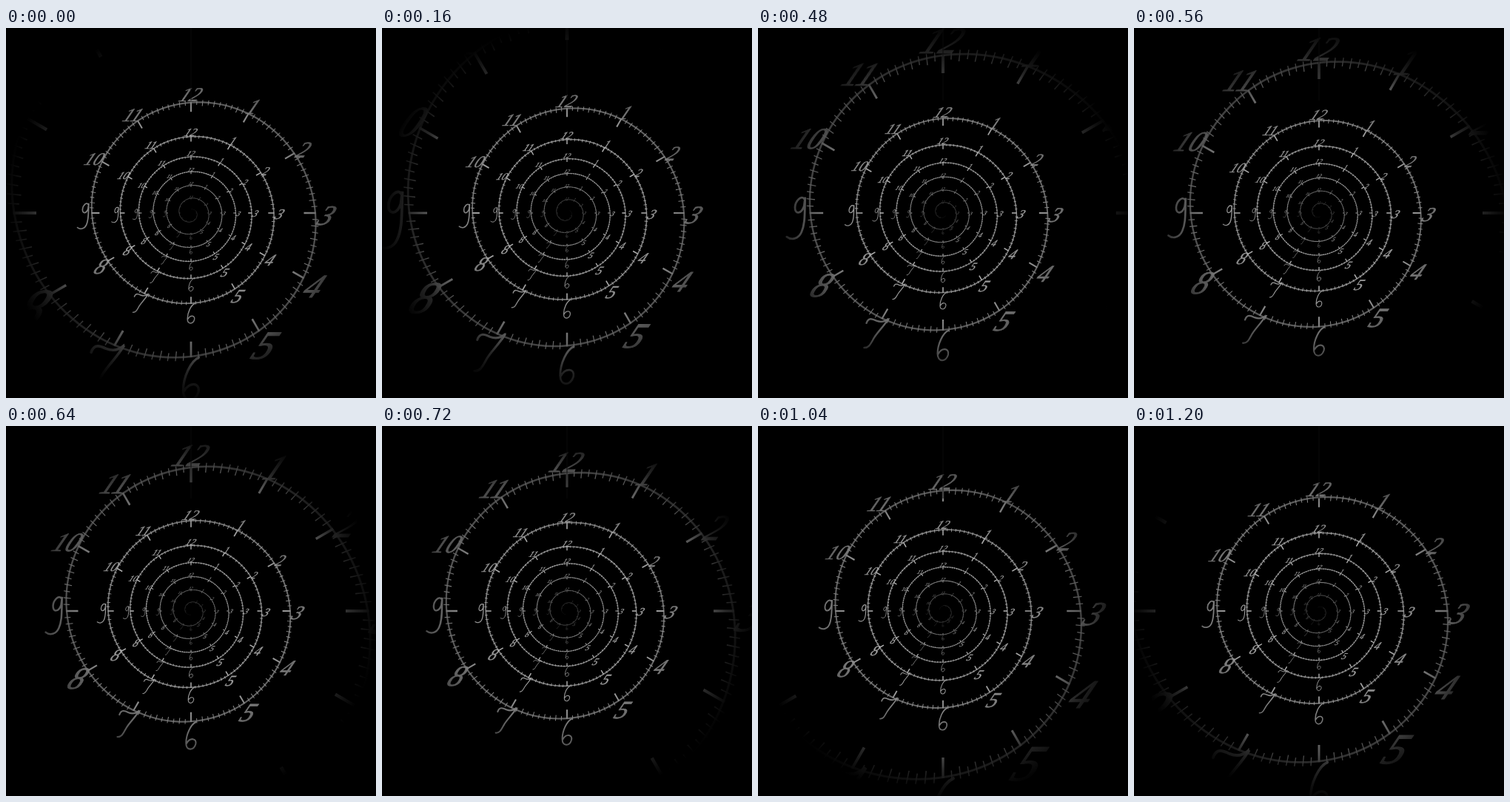
These frames come from a looping animation (500x500 px, 1.28 s). An HTML page:

```html
<!DOCTYPE html>
<html lang="en">
<head>
<meta charset="utf-8">
<title>Spiral clock</title>
<style>
  html, body { margin: 0; width: 100%; height: 100%; overflow: hidden; background: #000; }
  svg { display: block; width: 100vw; height: 100vh; }
  text { font: italic 145px "Liberation Serif", "Times New Roman", serif; text-anchor: middle; }
</style>
</head>
<body>
<svg viewBox="0 0 500 500">
  <defs>
    <radialGradient id="shade" gradientUnits="userSpaceOnUse" cx="250" cy="250" r="260"></radialGradient>
  </defs>
  <rect width="500" height="500" fill="#000"/>
  <g fill="#bcbcbc">
    <path id="ring" opacity=".72"/>
    <path id="ticks"/>
    <g id="labels" opacity=".92"></g>
  </g>
  <rect width="500" height="500" fill="url(#shade)"/>
  <path d="M250 0V98" stroke="#0b0b0b"/>
</svg>
<script>
const NS = 'http://www.w3.org/2000/svg';
const LOOP = 1280, STEPS = 16, TURNS = 7, C = 250;
const byId = id => document.getElementById(id);

function add(parent, tag, attrs) {
  const el = document.createElementNS(NS, tag);
  for (const key in attrs) el.setAttribute(key, attrs[key]);
  parent.appendChild(el);
  return el;
}

// Spiral radius at each quarter turn, starting one turn below zero
const RADII = [
  5, 8, 12, 16, 20, 24, 28.5, 33, 37.3, 41.8, 46.3, 51, 55.8, 60.5, 65.3, 70.5,
  76, 82, 88.5, 95.5, 103.3, 112, 122, 134, 149.3, 168, 194, 239, 320, 480
];

function radius(u) {
  const x = (u + 1) * 4, i = Math.floor(x), f = x - i;
  const at = k => RADII[Math.max(0, Math.min(RADII.length - 1, k))];
  const a = at(i - 1), b = at(i), c = at(i + 1), d = at(i + 2);
  return b + f / 2 * (c - a + f * (2 * a - 5 * b + 4 * c - d + f * (3 * (b - c) + d - a)));
}

function point(turn, r, side = 0) {
  const a = turn * 2 * Math.PI, s = Math.sin(a), c = Math.cos(a);
  return (C + r * s + side * c).toFixed(2) + ' ' + (C - r * c + side * s).toFixed(2);
}

// Darkness by distance from the centre
const SHADE = [
  [0, .96], [8, .85], [20, .58], [37, .18], [60, .02], [103, .06], [149, .3],
  [168, .41], [193, .57], [215, .79], [238, .92], [256, 1]
];
for (const [r, dark] of SHADE)
  add(byId('shade'), 'stop', { offset: r / 260, 'stop-color': '#000', 'stop-opacity': dark });

// Long-tailed script numerals, in units of 1/100 of the label height
const SCRIPT = {
  6: 'M36-98C0-82-36-10-36 55C-36 112 20 112 34 62C44 18-8 12-32 58',
  7: 'M-62-45C-50-82-25-72 0-60C25-50 50-52 74-74C45-25 10 5-15 45C-35 80-45 108-76 106',
  9: 'M24-88C8-112-24-78-26-45C-28-5 8-8 22-50L28-98C24-20 30 40 8 88C-8 124-45 132-70 112'
};
const GROW = { 3: 1.15, 4: 1.25, 5: 1.4, 8: 1.35 };

function makeLabel(hour, turn) {
  const el = add(byId('labels'), 'g', {});
  if (SCRIPT[hour]) {
    add(el, 'path', {
      d: SCRIPT[hour], fill: 'none', stroke: '#bcbcbc', 'stroke-width': 11,
      'stroke-linecap': 'round', transform: 'translate(0 14)'
    });
  } else {
    const k = GROW[hour] || 1;
    add(el, 'text', {
      y: 48, transform: `translate(0 14) skewX(-27) scale(${k})`, stroke: '#bcbcbc', 'stroke-width': 3
    }).textContent = hour;
  }
  return { el, hour, turn: turn + hour % 12 / 12 };
}

const labels = [];
for (let n = 0; n < TURNS; n++)
  for (let h = 1; h <= 12; h++) labels.push(makeLabel(h, n));

function ringPath(phase) {
  const outer = [], inner = [];
  for (let i = -120; i <= 720; i++) {
    const u = i / 120, r = radius(u), half = (.5 + .011 * r) / 2;
    outer.push(point(u + phase, r + half));
    inner.push(point(u + phase, r - half));
  }
  return 'M' + outer.concat(inner.reverse()).join('L') + 'Z';
}

function tickPath(phase) {
  let d = '';
  for (let i = -120; i < TURNS * 120; i++) {
    const turn = i / 120, u = turn - phase;
    if (u < -.8 || u > 6) continue;
    const r = radius(u), len = 1.4 + .0005 * r * r, major = i % 10 === 0;
    const top = r + len * (major ? .05 : .24);
    const end = r - len * (major ? 1 : i % 2 ? .28 : .4);
    const half = (major ? .8 + .1 * len : .5 + .04 * len) / 2;
    d += 'M' + [point(turn, top, -half), point(turn, top, half),
      point(turn, end, half), point(turn, end, -half)].join('L') + 'Z';
  }
  return d;
}

function draw(time) {
  const phase = Math.floor(time % LOOP / LOOP * STEPS) / STEPS;
  byId('ring').setAttribute('d', ringPath(phase));
  byId('ticks').setAttribute('d', tickPath(phase));
  for (const { el, hour, turn } of labels) {
    const u = turn - phase, shown = u > -.5 && u < 5.95;
    el.setAttribute('display', shown ? 'inline' : 'none');
    if (!shown) continue;
    const r = radius(u), h = 3 + .0007 * r * r;
    const gap = hour === 6 ? .88 : hour === 9 ? .55 : .7;
    el.setAttribute('transform', `translate(${point(turn, r + gap * h)}) scale(${h / 100})`);
  }
}

let start;
function tick(now) {
  if (start === undefined) start = now;
  draw(now - start);
  requestAnimationFrame(tick);
}
draw(0);
requestAnimationFrame(tick);
</script>
</body>
</html>
```
